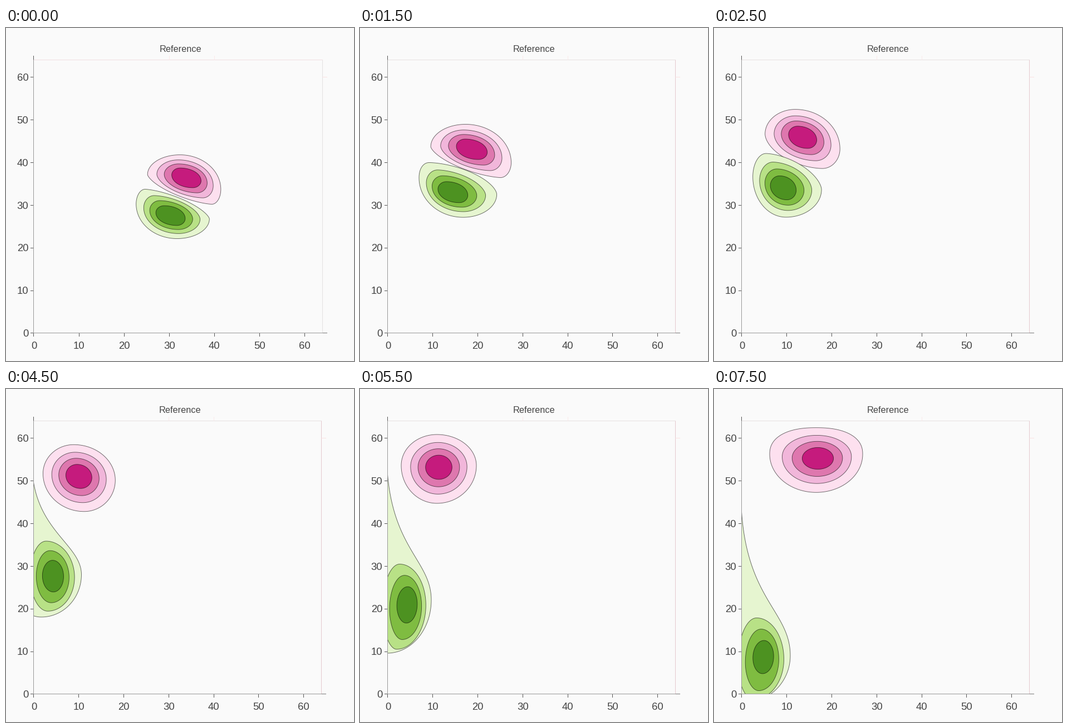
A matplotlib script that plays this animation: 625x600 px, repeating every 8000 ms.

```python
import numpy as np
import matplotlib.pyplot as plt
from matplotlib.animation import FuncAnimation
from matplotlib.patches import Polygon, Rectangle

W, H, DPI = 625, 600, 100
PX = 72 / DPI
BG, TEXT = "#fafafa", "#444444"
LEFT, TOP, BOTTOM = 50, 50, 550
SPAN = 65     # units along each axis
EDGE = 64     # end of the data
PINKS = ["#fde0ef", "#f1b6da", "#de77ae", "#c51b7d"]
GREENS = ["#e6f5d0", "#b8e186", "#7fbc41", "#4d9221"]
DEPTHS = [0, 0.385, 0.69, 1]   # each ring's way from outer edge to core

# Key poses: centre x, y, half width, half height,
# tilt, sideways nose, vertical bend, core lean, tail height
STEPS = [0, 2, 4, 6, 8]
PINK = np.array([
    [320, 273, 65.8, 44.5, 0.3, 0.32, 0.1, 4, 0],
    [199.3, 221.5, 72.2, 48, 0.3, 0.3, 0.14, 1.5, 0],
    [136.3, 179.5, 62.3, 58.5, 0.2, 0.04, 0.03, -1, 0],
    [141.5, 144, 67.5, 62, 0, -0.05, -0.1, 0, 0],
    [183.5, 128, 83.5, 58.3, 0, 0, -0.18, 3, 0]])
GREEN = np.array([
    [299.5, 335, 65.8, 44.5, 0.3, -0.32, -0.1, -4, -98],
    [175.8, 291.8, 69.8, 49.3, 0.3, -0.3, -0.14, -9, -98],
    [100.5, 296.5, 53.6, 65.5, 0.1, -0.35, 0, -5, 98],
    [76, 383, 52, 93, -0.05, -0.45, 0.02, 8.5, 235],
    [81.5, 476, 55.5, 89, -0.05, -0.42, 0.1, 7, 263]])


def pose(keys, step):
    """Centre on a smooth path, shape eased straight between keys."""
    path = [np.polyval(np.polyfit(STEPS, c, 4), step) for c in keys.T[:2]]
    return path + [np.interp(step, STEPS, c) for c in keys.T[2:]]


def arc(side, cap, power=2):
    """Quarter superellipse from a side extreme to a top or bottom one."""
    t = np.linspace(0, np.pi / 2, 40)
    u = np.clip(np.cos(t), 0, 1) ** (2 / power)
    v = np.sin(t) ** (2 / power)
    return np.column_stack([cap[0] + (side[0] - cap[0]) * u,
                            side[1] + (cap[1] - side[1]) * v])


def tail_curve(tip, side):
    """S-shaped Bezier from the wall down to the right-hand extreme."""
    rise = side[1] - tip[1]
    a = (tip[0] + 2400 / rise, tip[1] + 0.75 * rise - 33)
    b = (side[0], side[1] - 0.3 * rise)
    t = np.linspace(0, 1, 60)[:, None]
    p = [np.array(q) for q in (tip, a, b, side)]
    return ((1 - t)**3 * p[0] + 3 * t * (1 - t)**2 * p[1]
            + 3 * t**2 * (1 - t) * p[2] + t**3 * p[3])


def ring(shape, depth, core, sink):
    """Outline at a depth: skewed outside, a plain tilted ellipse inside."""
    cx, cy, hw, hh, tilt, nose, bend, lean, tail = shape
    pinch = max(1, tail / 110)
    kx, ky = cx + lean, cy + sink

    def mix(outer, inner, f=depth):
        return outer + (inner - outer) * f

    x0, x1 = mix(cx - hw, kx - hw * core), mix(cx + hw, kx + hw * core)
    y0 = mix(cy - hh, ky - hh * core)
    y1 = mix(cy + hh, ky + hh * core, depth**pinch)
    mx, my, rx, ry = (x0 + x1) / 2, (y0 + y1) / 2, (x1 - x0) / 2, (y1 - y0) / 2

    fade = 1 - depth
    nose, bend = nose * fade, bend * fade
    left = (x0, my + ry * (bend - tilt))
    right = (x1, my + ry * (bend + tilt))
    top = (mx + rx * (nose - 1.45 * tilt), y0)
    bottom = (mx + rx * (nose + 1.45 * tilt), y1)

    flat = 5.7 * nose * tilt
    square = 2 + 4 * max(0, -bend - 0.1)
    has_tail = tail > 0 and depth == 0
    if has_tail:
        left = (x0 - 27, left[1])
    parts = [arc(right, bottom), arc(left, bottom, 2 - max(0, flat))[::-1]]
    if has_tail:
        parts.append(tail_curve((LEFT - 1, cy - tail), right))
    else:
        parts += [arc(left, top, square),
                  arc(right, top, square - max(0, -flat))[::-1]]
    return np.concatenate(parts)


fig = plt.figure(figsize=(W / DPI, H / DPI), dpi=DPI, facecolor=BG)
ax = fig.add_axes([0, 0, 1, 1])


def line(x0, y0, x1, y1, color):
    ax.plot([x0, x1], [y0, y1], color=color, lw=PX, snap=False,
            solid_capstyle="butt", zorder=5)


def label(x, y, text, size, ha="center"):
    ax.text(x, y, text, fontsize=size * PX, family="Liberation Sans",
            color=TEXT, ha=ha, va="baseline")


def crisp(v):
    return np.ceil(v) - 0.5


def draw_axes(right, top_color, side_color):
    xs, ys = (right - LEFT) / SPAN, (BOTTOM - TOP) / SPAN
    edge_x, edge_y = crisp(LEFT + EDGE * xs), crisp(BOTTOM - EDGE * ys)
    line(LEFT, edge_y, edge_x, edge_y, top_color)
    line(edge_x, edge_y, edge_x, BOTTOM, side_color)
    for v in (30, 40):
        x = crisp(LEFT + v * xs)
        line(x, TOP, x, edge_y, "#fbeaea")
    y60 = crisp(BOTTOM - 60 * ys)
    line(edge_x, y60, right, y60, "#fbe2e2")
    line(LEFT - 0.5, edge_y, LEFT - 0.5, BOTTOM, "#999999")
    line(LEFT - 0.5, TOP, LEFT - 0.5, edge_y, "#555555")
    line(LEFT, BOTTOM - 0.5, edge_x, BOTTOM - 0.5, "#999999")
    line(edge_x, BOTTOM - 0.5, right, BOTTOM - 0.5, "#777777")
    for v in range(0, 61, 10):
        x, y = LEFT + v * xs, BOTTOM - v * ys
        line(crisp(x), BOTTOM, crisp(x), BOTTOM + 6, "#555555")
        line(LEFT - 6, crisp(y), LEFT - 1, crisp(y), "#555555")
        label(x, 578, str(v), 18.5)
        label(40.3, y + 6.3, str(v), 18.5, "right")
    label((LEFT + right) / 2, 42.8, "Reference", 16.2)


def draw(n):
    ax.clear()
    ax.set(xlim=(0, W), ylim=(H, 0))
    ax.axis("off")
    step = (n + 1) // 2
    if step < 2:
        right, border = 577, ("#f0dee1", "#e3e0e0")
    else:
        right, border = 575, ("#e6e0e1", "#e4c9cf")
    clip = Rectangle((LEFT, TOP), right - LEFT, BOTTOM - TOP,
                     transform=ax.transData)
    core = 0.4 - 0.008 * step
    for keys, colors, sink in ((PINK, PINKS, -3),
                               (GREEN, GREENS, 3 + 0.5 * step)):
        shape = pose(keys, step)
        for depth, color in zip(DEPTHS, colors):
            patch = Polygon(ring(shape, depth, core, sink), fc=color,
                            ec=(0, 0, 0, 0.6), lw=0.9 * PX, zorder=2)
            ax.add_patch(patch)
            patch.set_clip_path(clip)
    draw_axes(right, *border)
    return []


anim = FuncAnimation(fig, draw, frames=16, interval=500, repeat=True)
plt.show()
```
